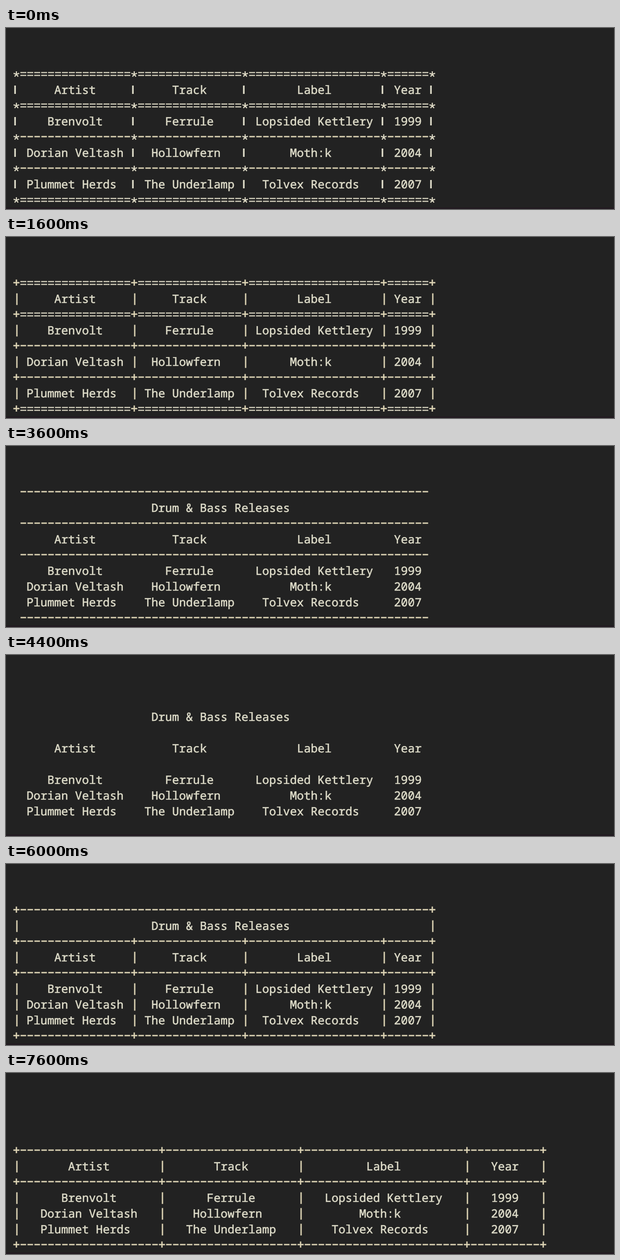
These frames come from a looping animation (1228 by 368 pixels, 8000 ms). An HTML page:

```html
<!DOCTYPE html>
<html lang="en">
<head>
<meta charset="utf-8">
<title>Text table styles</title>
<style>
  html, body { margin: 0; width: 100%; height: 100%; overflow: hidden; background: #222; }
  svg { display: block; width: 1228px; height: 368px; }
  text {
    font: 23.3333px "Noto Sans Mono", "DejaVu Sans Mono", monospace;
    fill: #dedcc9;
    stroke: #dedcc9;
    stroke-width: 0.55;
    white-space: pre;
    text-rendering: geometricPrecision;
  }
  path { fill: none; stroke: #dcd3b4; stroke-width: 2.7; }
  .pale { stroke: #dad6c2; stroke-width: 2.3; }
  .thick { stroke: #dedcc9; stroke-width: 3.2; }
</style>
</head>
<body>
<svg id="stage" viewBox="0 0 1228 368"></svg>
<script>
const NS = "http://www.w3.org/2000/svg";
const CELL = 14, LEFT = 14, LINE = 32, LINES = 11, STEP = 400;

const title = "Drum & Bass Releases";
const head = ["Artist", "Track", "Label", "Year"];
const rows = [
  ["Brenvolt", "Ferrule", "Lopsided Kettlery", "1999"],
  ["Dorian Veltash", "Hollowfern", "Moth:k", "2004"],
  ["Plummet Herds", "The Underlamp", "Tolvex Records", "2007"]
];
const widths = head.map((h, i) => Math.max(h.length, ...rows.map(r => r[i].length)));

// Each step changes a few settings of the table before it.
const steps = [
  { title: 0, head: 1, sep: 1, pad: 1, joint: "*", bar: "I", edge: "=", rule: "=",
    vOut: 1, vIn: 1, hOut: 1, hIn: 1 },
  { bar: "|" },
  { head: 0 },
  { joint: "+" },
  { head: 1 },
  { title: 1 },
  { edge: "-" },
  { vIn: 0, rule: "-" },
  { vOut: 0 },
  { sep: 0 },
  { hIn: 0 },
  { hOut: 0 },
  { vOut: 1 },
  { vIn: 1 },
  { hOut: 1 },
  { hIn: 1 },
  { title: 0, pad: 2 },
  { pad: 3 },
  { pad: 4 },
  { pad: 3 }
];

// Strokes of the border characters; x is the cell's left edge, y the line's middle.
const glyphs = {
  "-": (x, y) => `M${x + 1.4} ${y - 1.2}h11.2`,
  "=": (x, y) => `M${x + 1} ${y - 3.4}h12M${x + 1} ${y + 2.4}h12`,
  "+": (x, y) => `M${x + 0.8} ${y - 1.2}h12.4M${x + 7} ${y - 7.4}v12.4`,
  "|": (x, y) => `M${x + 8} ${y - 11.4}v23.6`,
  "I": (x, y) => `M${x + 4.3} ${y - 9}v17`,
  "*": (x, y) => [0, 1, 2, 3, 4].map(i => {
    const a = i * Math.PI * 0.4 - Math.PI / 2;
    return `M${x + 7} ${y}L${x + 7 + 6 * Math.cos(a)} ${y + 6 * Math.sin(a)}`;
  }).join("")
};
const looks = { "=": "pale", "*": "pale", "I": "thick" };

function add(parent, tag, attrs = {}, content = "") {
  const el = document.createElementNS(NS, tag);
  for (const k in attrs) el.setAttribute(k, attrs[k]);
  el.textContent = content;
  return parent.appendChild(el);
}

function buildTable(parent, s) {
  const group = add(parent, "g", { visibility: "hidden" });
  const cols = [0];
  widths.forEach(w => cols.push(cols[cols.length - 1] + w + 2 * s.pad + 1));
  const end = cols[cols.length - 1];

  const layout = [{ line: s.edge, outer: true, joined: !s.title }];
  if (s.title) layout.push({ title }, { line: "-", joined: true });
  if (s.head) layout.push({ cells: head }, { line: s.rule, joined: true });
  rows.forEach((cells, i) => {
    if (i && s.sep) layout.push({ line: "-", joined: true });
    layout.push({ cells });
  });
  layout.push({ line: s.edge, outer: true, joined: true });

  const strokes = {};
  const put = (ch, col, y) => {
    strokes[ch] = (strokes[ch] || "") + glyphs[ch](LEFT + col * CELL, y);
  };
  const center = (str, from, to, y) => {
    const col = from + 1 + Math.floor((to - from - 1 - str.length) / 2);
    add(group, "text", { x: LEFT + col * CELL - 0.4, y: y + 8 }, str);
  };
  const posts = (ch, inner, y) => cols.forEach(c => {
    const outer = c === 0 || c === end;
    if (outer ? s.vOut : inner && s.vIn) put(ch, c, y);
  });

  layout.forEach((item, i) => {
    const y = 30 + LINE * (LINES - layout.length + i);
    if (item.line) {
      if (item.outer ? s.hOut : s.hIn) {
        posts(s.joint, item.joined, y);
        for (let c = 1; c < end; c++) {
          const joint = item.joined && s.vIn && cols.includes(c);
          if (!joint) put(item.line, c, y);
        }
      } else if (!item.outer) {
        posts(s.bar, false, y);
      }
    } else {
      posts(s.bar, !!item.cells, y);
      if (item.cells) item.cells.forEach((str, k) => center(str, cols[k], cols[k + 1], y));
      else center(item.title, 0, end, y);
    }
  });

  for (const ch in strokes) add(group, "path", { d: strokes[ch], class: looks[ch] || "" });
  return group;
}

const stage = document.getElementById("stage");
add(stage, "rect", { y: 365, width: 1228, height: 3, fill: "#211a20" });
const state = {};
const tables = steps.map(step => buildTable(stage, Object.assign(state, step)));

let shown = -1;
const start = performance.now();
function draw(now) {
  const i = Math.floor(Math.max(0, now - start) / STEP) % tables.length;
  if (i !== shown) {
    tables.forEach((t, k) => t.setAttribute("visibility", k === i ? "visible" : "hidden"));
    shown = i;
  }
  requestAnimationFrame(draw);
}
draw(start);
</script>
</body>
</html>
```
